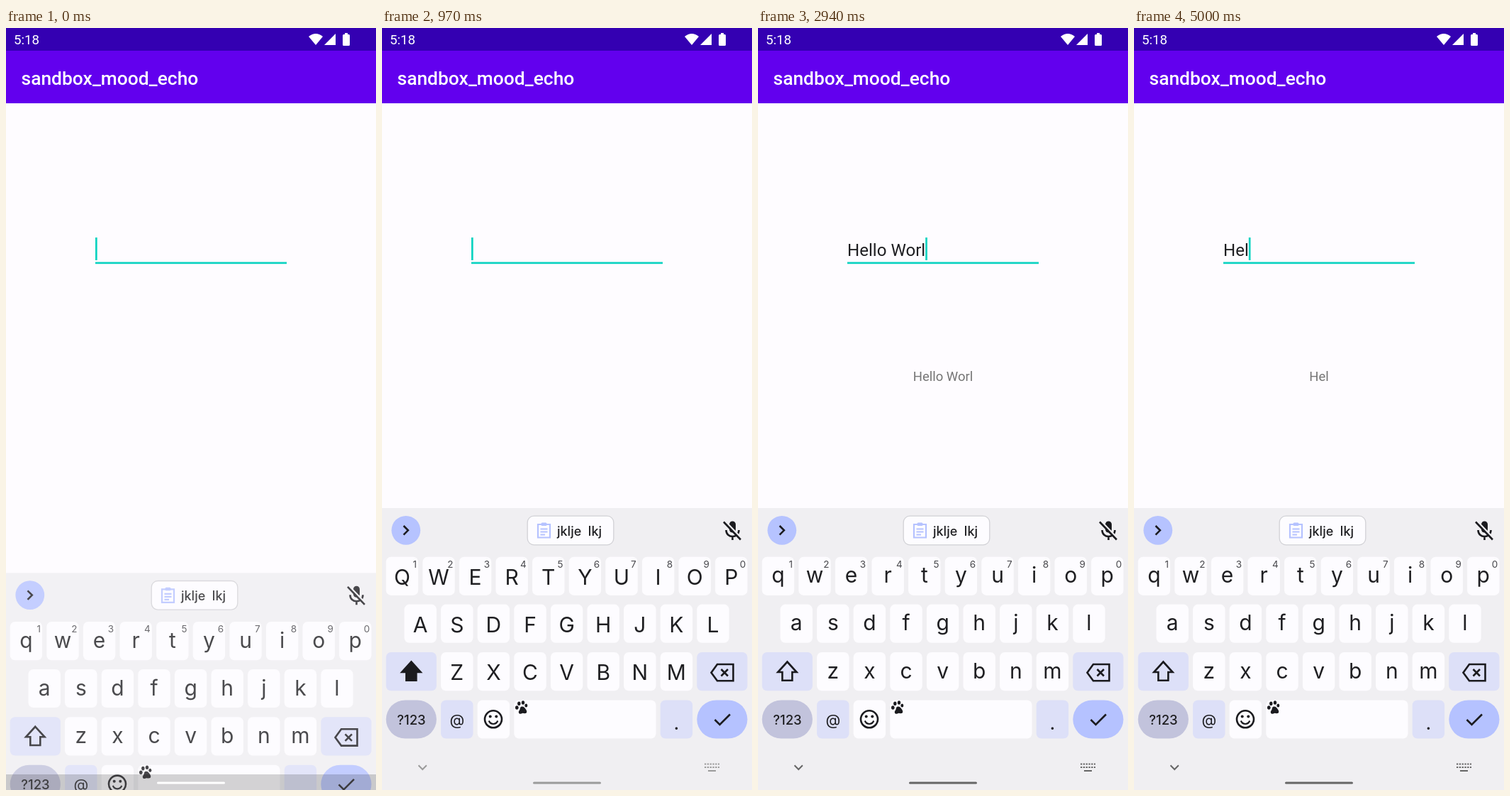
An HTML page that plays this animation: 522x1073 px, repeating every 5030 ms.

```html
<!DOCTYPE html>
<html lang="en">
<head>
<meta charset="utf-8">
<title>Text field echo</title>
<style>
  html, body { margin: 0; width: 100%; height: 100%; overflow: hidden; background: #fefcff; }
  svg { display: block; width: 100%; height: 100%; }
  text { font-family: Roboto, sans-serif; white-space: pre; }
  #board text { font-family: Inter, Roboto, sans-serif; fill: #1f1f22; }
  .letter { font-size: 30px; text-anchor: middle; }
  #board .hint { font-size: 13.5px; text-anchor: end; fill: #48484c; }
  .line { fill: none; stroke: #1b1b1f; stroke-width: 2.6; }
  .clip { fill: none; stroke: #b5c2ff; stroke-width: 2.2; }
</style>
</head>
<body>
<svg viewBox="0 0 522 1073">
  <rect width="522" height="1073" fill="#fefcff"/>
  <rect width="522" height="32" fill="#3400b2"/>
  <rect y="32" width="522" height="74" fill="#6200ee"/>
  <g fill="#fff">
    <text x="11" y="23" font-size="18.7">5:18</text>
    <path d="M427 12Q437 4 447 12L437 24ZM449 24L465 8V24Z"/>
    <path d="M478 7h4v2h1.5q1.5 0 1.5 1.5v13q0 1.5-1.5 1.5h-7q-1.5 0-1.5-1.5v-13q0-1.5 1.5-1.5h1.5z"/>
    <text x="21.5" y="79.5" font-size="26.4" font-weight="500">sandbox_mood_echo</text>
  </g>

  <text id="field" x="126" y="320.5" font-size="24.1" fill="#1f1f22"></text>
  <rect x="126" y="329.5" width="270" height="2.7" fill="#0bd3c1"/>
  <rect id="caret" y="295" width="2.7" height="32" fill="#0bd3c1"/>
  <text id="echo" x="261" y="497.3" font-size="18.5" fill="#757575" text-anchor="middle"></text>

  <g id="board">
    <rect y="676" width="522" height="500" fill="#f0eff2"/>
    <circle cx="33.8" cy="707.3" r="20.4" fill="#b6c3ff"/>
    <path class="line" d="M30.5 701l6.3 6.3-6.3 6.3"/>
    <rect x="205.2" y="687.2" width="121.6" height="40.6" rx="9" fill="#fdfcff" stroke="#d2d2d6" stroke-width="1.3"/>
    <path class="clip" d="M220 699h17v18.5h-17zM223.500 705.500h10M223.500 709.500h10M223.500 713.500h6.500"/>
    <rect x="224.500" y="696.500" width="8" height="4.500" rx="1.500" fill="#b5c2ff"/>
    <text x="247" y="715" font-size="18" font-weight="500">jklje  lkj</text>

    <rect x="490" y="694.5" width="9" height="16" rx="4.500" fill="#1b1b1f"/>
    <path class="line" stroke-width="2.4" d="M485.500 707c0 12 18 12 18 0M494.500 715v6"/>
    <path d="M483.500 694L507.500 719" stroke="#f0eff2" stroke-width="2.6"/>
    <path class="line" d="M482 695.500L506 720.500"/>

    <g id="keys"></g>

    <path id="shift" class="line" d="M41.300 892.500L54.500 907H48.300V918.700H34.300V907H28.100Z"/>
    <path class="line" d="M473 896H495.500V919.300H473L464.500 907.700ZM478.500 903l9.500 9.500M488 903l-9.500 9.500"/>
    <circle class="line" cx="157" cy="973.300" r="12"/>
    <circle cx="152.700" cy="969.500" r="2" fill="#1b1b1f"/>
    <circle cx="161.300" cy="969.500" r="2" fill="#1b1b1f"/>
    <path class="line" style="stroke-width:2.2" d="M150.800 975.500c2.500 6 10 6 12.500 0"/>
    <path class="line" d="M469.500 974l7 7L491 966.500"/>
    <g fill="#1b1b1f">
      <ellipse cx="190.300" cy="957" rx="2.300" ry="2.700"/>
      <ellipse cx="193.300" cy="951.300" rx="2.200" ry="2.800"/>
      <ellipse cx="199" cy="950" rx="2.200" ry="2.700"/>
      <ellipse cx="203.300" cy="954" rx="2" ry="2.500"/>
      <path d="M197.500 955.500c3 0 4 2 5.500 4s2 5-.5 5.500-3-.5-4.500 0-4 1.500-5-.5 1-3.500 1.500-5 .5-4 3-4z"/>
    </g>
    <text x="41.500" y="981" font-size="18.500" font-weight="500" text-anchor="middle">?123</text>
    <text x="105.800" y="981.500" font-size="21.500" text-anchor="middle">@</text>
    <text x="415.400" y="987.500" font-size="27" text-anchor="middle">.</text>
    <path class="line nav" style="stroke-width:2" d="M51.500 1038.300l5.700 5.700 5.700-5.700"/>
    <path class="line nav" style="stroke-width:2.200" stroke-dasharray="2.300 1.500" d="M455 1036.500h21M455 1041h21"/>
    <path class="line nav" style="stroke-width:2" d="M460 1046h11"/>
  </g>

  <rect id="scrim" y="1051" width="522" height="22" fill="#000"/>
  <path id="handle" class="nav" d="M214.500 1063H307.500" stroke-width="3" stroke-linecap="round"/>
</svg>
<script>
const LOOP = 5030, PITCH = 51.6, LEFT = 5.7, KEY = 45.4;
const CAPS = [[230, 1040], [2060, 2270]];
const CARET_OFF = [420, 920];
const PHRASE = 'Hello World';
const typed = [1040, 1180, 1300, 1430, 1560, 1760, 2270, 2480, 2680, 2850, 3100];
const erased = Array.from({ length: 8 }, (_, i) => 3600 + 190 * i);
const navTone = [[120, 255], [550, 165], [970, 155], [1490, 120], [2940, 102]];

const $ = id => document.getElementById(id);
const field = $('field'), caret = $('caret'), echo = $('echo'), board = $('board');
const navParts = document.querySelectorAll('.nav');

function add(tag, attrs, content = '') {
  const el = document.createElementNS('http://www.w3.org/2000/svg', tag);
  for (const name in attrs) el.setAttribute(name, attrs[name]);
  el.textContent = content;
  return $('keys').appendChild(el);
}

// Columns may be fractional; span counts key pitches.
function key(col, y, span = 1, fill = '#fdfcff', rx = 7) {
  const x = LEFT + col * PITCH;
  add('rect', { x, y, width: KEY + (span - 1) * PITCH, height: 54.2, rx, fill });
  return x;
}

const letters = [];
[['qwertyuiop', 0, 744.7], ['asdfghjkl', .5, 811.6], ['zxcvbnm', 1.5, 879]].forEach(([row, start, y], r) => {
  [...row].forEach((char, i) => {
    const x = key(start + i, y);
    const el = add('text', { class: 'letter', x: x + KEY / 2 });
    letters.push({ el, char, y });
    if (!r) add('text', { class: 'hint', x: x + 43.3, y: 760 }, (i + 1) % 10);
  });
});
const BLUE = '#dde0f8';
key(0, 879, 1.5, BLUE);
key(8.5, 879, 1.5, BLUE);
key(0, 946.4, 1.5, '#c2c3dc', 27.1);
key(1.5, 946.4, 1, BLUE);
key(2.5, 946.4);
key(3.5, 946.4, 4);
key(7.5, 946.4, 1, BLUE);
key(8.5, 946.4, 1.5, '#b5c2ff', 27.1);

const within = (t, [from, to]) => t >= from && t < to;
const passed = (times, t) => times.filter(x => x <= t).length;

function interpolate(points, t) {
  const i = points.findIndex(p => p[0] > t);
  if (i < 0) return points[points.length - 1][1];
  if (!i) return points[0][1];
  const [t0, v0] = points[i - 1], [t1, v1] = points[i];
  return v0 + (v1 - v0) * (t - t0) / (t1 - t0);
}

let wasUpper;
function setCase(upper) {
  if (upper === wasUpper) return;
  wasUpper = upper;
  for (const { el, char, y } of letters) {
    el.textContent = upper ? char.toUpperCase() : char;
    el.setAttribute('y', y + (upper ? 39 : 36.7));
  }
  $('shift').style.fill = upper ? '#1b1b1f' : 'none';
}

function draw() {
  const t = performance.now() % LOOP;

  // The keyboard rises in coarse steps, slowing as it settles.
  const left = Math.max(0, 1 - Math.floor(t / 30) / 4);
  board.setAttribute('transform', `translate(0 ${91.3 * left ** 2})`);
  board.setAttribute('opacity', 1 - .2 * left);
  $('scrim').setAttribute('opacity', .17 * left);

  const tone = Math.round(interpolate(navTone, t));
  navParts.forEach(el => { el.style.stroke = `rgb(${tone},${tone},${tone})`; });

  setCase(CAPS.some(span => within(t, span)));

  const text = PHRASE.slice(0, passed(typed, t) - passed(erased, t));
  field.textContent = echo.textContent = text;
  caret.setAttribute('x', 126 + (text ? field.getComputedTextLength() : 0));
  caret.setAttribute('opacity', within(t, CARET_OFF) ? 0 : 1);

  requestAnimationFrame(draw);
}
draw();
</script>
</body>
</html>
```
